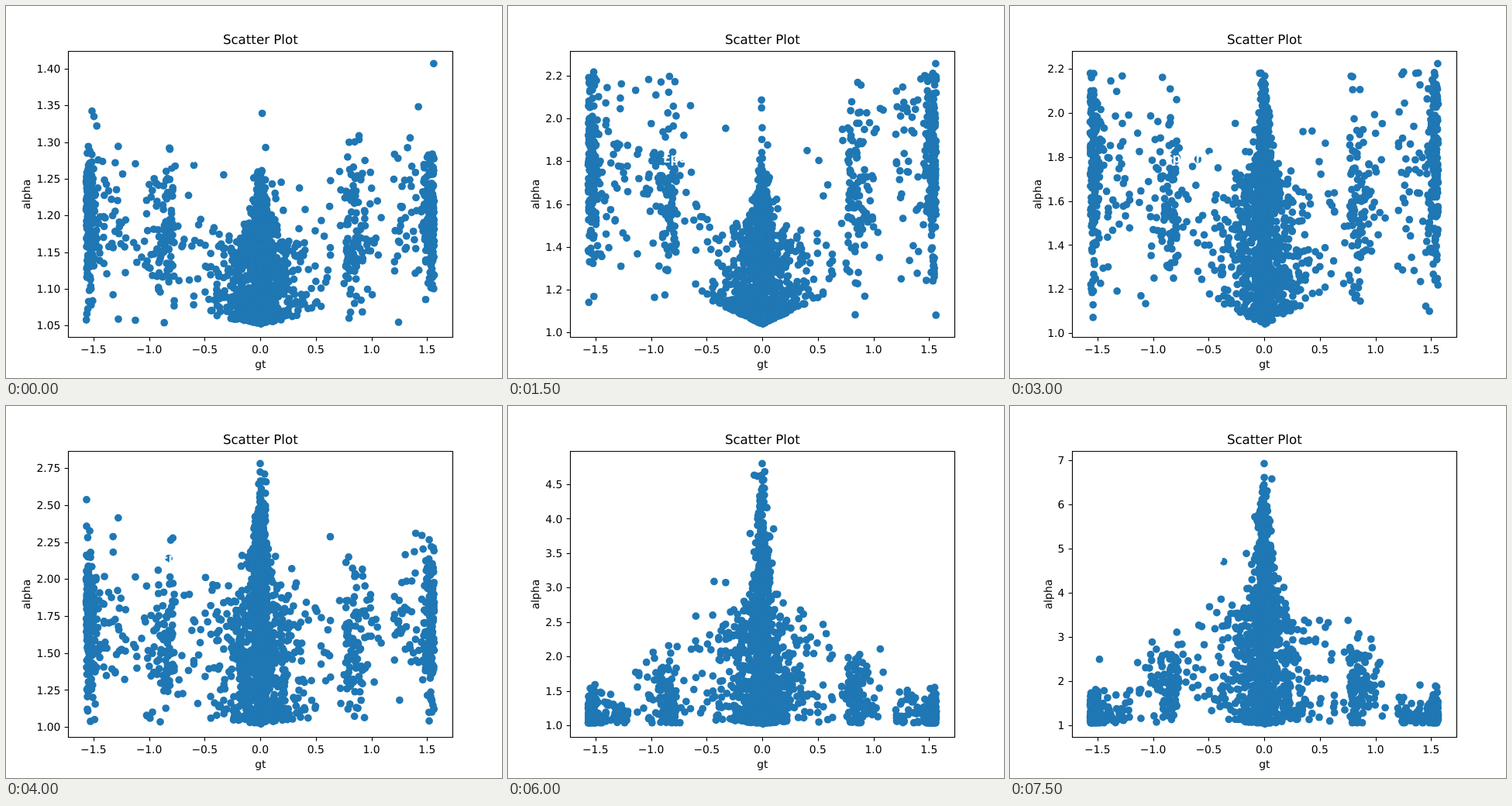
These frames come from a looping animation (640 px wide and 480 px high, 8 s). An HTML page with a canvas:

```html
<!DOCTYPE html>
<html lang="en">
<head>
<meta charset="utf-8">
<title>Scatter Plot</title>
<style>
  html, body { margin: 0; width: 640px; height: 480px; overflow: hidden; background: #fff; }
  canvas, svg { position: absolute; left: 0; top: 0; display: block; }
  text { font: 13.89px "DejaVu Sans", sans-serif; fill: #000; text-rendering: geometricPrecision; }
  .mid { text-anchor: middle; }
  .end { text-anchor: end; }
  #title { font-size: 16.67px; }
  #epoch { font: bold 17px "Open Sans", sans-serif; fill: #fff; }
  path { fill: none; stroke: #000; stroke-width: 1.11; }
</style>
</head>
<body>
<canvas id="dots" width="640" height="480"></canvas>
<svg width="640" height="480" viewBox="0 0 640 480">
  <path d="M80.5 58.5H576.5V427.5H80.5Z"/>
  <g id="xAxis"></g>
  <g id="yAxis"></g>
  <text id="title" class="mid" x="328.3" y="49.3">Scatter Plot</text>
  <text class="mid" x="328.3" y="467">gt</text>
  <text id="yLabel" class="mid">alpha</text>
  <text id="epoch" x="200" y="202">Epoch 15</text>
</svg>
<script>
const STEP_MS = 500, EPOCHS = 16, FIRST_EPOCH = 15;
const X0 = 328, X_UNIT = 143.5, TOP = 74.4, BOTTOM = 410.4, RADIUS = 4.86;
const CORE_WIDTH = .09;
const $ = id => document.getElementById(id);
const ctx = $("dots").getContext("2d");

// low, high: range of alpha. The rest are shares of the plot height:
// mean of the edge and side groups, then the core's base, top, skew and lift.
const keys = [
  { at: 0,  low: 1.052, high: 1.407, edge: .4,  side: .36, base: .34, top: .56, skew: 1.2, lift: .08 },
  { at: 2,  low: 1.012, high: 2.222, edge: .62, side: .5,  base: .26, top: .48, skew: 2.3, lift: 0 },
  { at: 4,  low: 1.064, high: 2.322, edge: .6,  side: .54, base: .5,  top: .74, skew: 1,   lift: .4 },
  { at: 6,  low: 1.042, high: 2.222, edge: .6,  side: .46, base: .55, top: .92, skew: 1.1, lift: .2 },
  { at: 8,  low: 1.02,  high: 2.78,  edge: .39, side: .32, base: .52, top: .9,  skew: 1.1, lift: .05 },
  { at: 12, low: 1.018, high: 4.8,   edge: .01, side: .11, base: .42, top: .92, skew: 1.5, lift: .05 },
  { at: 15, low: 1.02,  high: 6.93,  edge: .01, side: .16, base: .46, top: .92, skew: 1.3, lift: .05 }
];

function seeded(s) {
  return () => {
    s = s + 0x6D2B79F5 | 0;
    let t = Math.imul(s ^ s >>> 15, 1 | s);
    t = t + Math.imul(t ^ t >>> 7, 61 | t) ^ t;
    return ((t ^ t >>> 14) >>> 0) / 4294967296;
  };
}
const bell = rnd => Math.sqrt(-2 * Math.log(1 - rnd())) * Math.cos(2 * Math.PI * rnd());

// The gt values stay the same in every epoch.
const points = [];
const rx = seeded(41);
const add = (n, kind, pick) => { while (n--) points.push({ kind, gt: pick() }); };
const within = (a, b) => () => a + (b - a) * rx();
const off = (from, dev) => () => from + dev * Math.abs(bell(rx));
const around = dev => () => dev * bell(rx);

for (const s of [-1, 1]) {
  add(165, "edge", off(s * 1.565, -s * .045));
  add(42, "edge", within(s * 1.5, s * 1.2));
  add(90, "side", off(s * .76, s * .13));
  add(20, "side", within(s * .68, s * 1.1));
  add(10, "side", within(s * .3, s * .7));
  add(15, "core", within(s * .3, s * .65));
}
add(420, "core", around(.03));
add(550, "core", around(.14));
add(90, "core", around(.28));

function stateAt(i) {
  const k = Math.max(1, keys.findIndex(s => s.at >= i));
  const a = keys[k - 1], b = keys[k], f = (i - a.at) / (b.at - a.at);
  const state = {};
  for (const key in a) state[key] = a[key] + (b[key] - a[key]) * (key === "high" ? f ** 1.5 : f);
  return state;
}

function heightOf({ kind, gt }, s, rnd) {
  const far = rnd() < .05 ? 1.5 : 1;
  if (kind === "core") {
    const d = Math.abs(gt), low = s.lift * d;
    const span = s.base + (s.top - s.base) * Math.exp(-((d / CORE_WIDTH) ** 1.5)) - low;
    return low + span * rnd() ** s.skew * (.85 + .25 * rnd()) * far;
  }
  const mean = s[kind], dev = .05 + .25 * mean;
  return Math.abs(mean + dev * far * bell(rnd));
}
const fold = v => v > .97 ? 1.94 - v : v;

function dot(x, y) {
  ctx.beginPath();
  ctx.arc(x, y, RADIUS, 0, 2 * Math.PI);
  ctx.fill();
}

function drawDots(i, state) {
  const rnd = seeded(900 + i * 77);
  ctx.clearRect(0, 0, 640, 480);
  ctx.fillStyle = "#1f77b4";
  for (const p of points) {
    const v = Math.max(.005, fold(heightOf(p, state, rnd)));
    dot(X0 + X_UNIT * p.gt, BOTTOM - v * (BOTTOM - TOP));
  }
  dot(X0 + 1, BOTTOM);
  dot(i < 8 ? X0 + X_UNIT * 1.56 : X0, TOP);
}

const snap = v => Math.floor(v + .5) + .5;
const label = (cls, x, y, s) => `<text class="${cls}" x="${x}" y="${y}">${s}</text>`;

function drawXAxis() {
  let out = "";
  for (let t = -1.5; t <= 1.5; t += .5) {
    const x = X0 + X_UNIT * t;
    out += `<path d="M${snap(x)} 427.5V432.4"/>`;
    out += label("mid", x, 447.6, t.toFixed(1).replace("-", "\u2212"));
  }
  $("xAxis").innerHTML = out;
}

// Smallest round step that gives at most nine intervals
function tickStep(range) {
  const power = 10 ** Math.floor(Math.log10(range / 9));
  return power * [1, 2, 2.5, 5, 10].find(m => range / (m * power) <= 9);
}

function drawYAxis({ low, high }) {
  const unit = (BOTTOM - TOP) / (high - low);
  const step = tickStep((high - low) * 1.1);
  const decimals = [0, 1, 2].find(d => Math.abs(step - step.toFixed(d)) < 1e-9);
  let out = "";
  for (let k = Math.round(1 / step); k * step < high + 1; k++) {
    const y = BOTTOM - (k * step - low) * unit;
    if (y < 57.6 || y > 427.2) continue;
    out += `<path d="M80.5 ${snap(y)}H75.6"/>`;
    out += label("end", 70.3, y + 5.06, (k * step).toFixed(decimals));
  }
  $("yAxis").innerHTML = out;
  const width = 8.84 * (1 + decimals) + (decimals ? 4.42 : 0);
  $("yLabel").setAttribute("transform", `translate(${62.4 - width} 243) rotate(-90)`);
}

let shown = -1;
function show(time) {
  const i = Math.floor(time / STEP_MS) % EPOCHS;
  if (i === shown) return;
  shown = i;
  const state = stateAt(i);
  drawDots(i, state);
  drawYAxis(state);
  $("epoch").textContent = "Epoch " + (FIRST_EPOCH + i);
}

drawXAxis();
const start = performance.now();
function run(now) {
  show(Math.max(0, now - start));
  requestAnimationFrame(run);
}
run(start);
</script>
</body>
</html>
```
